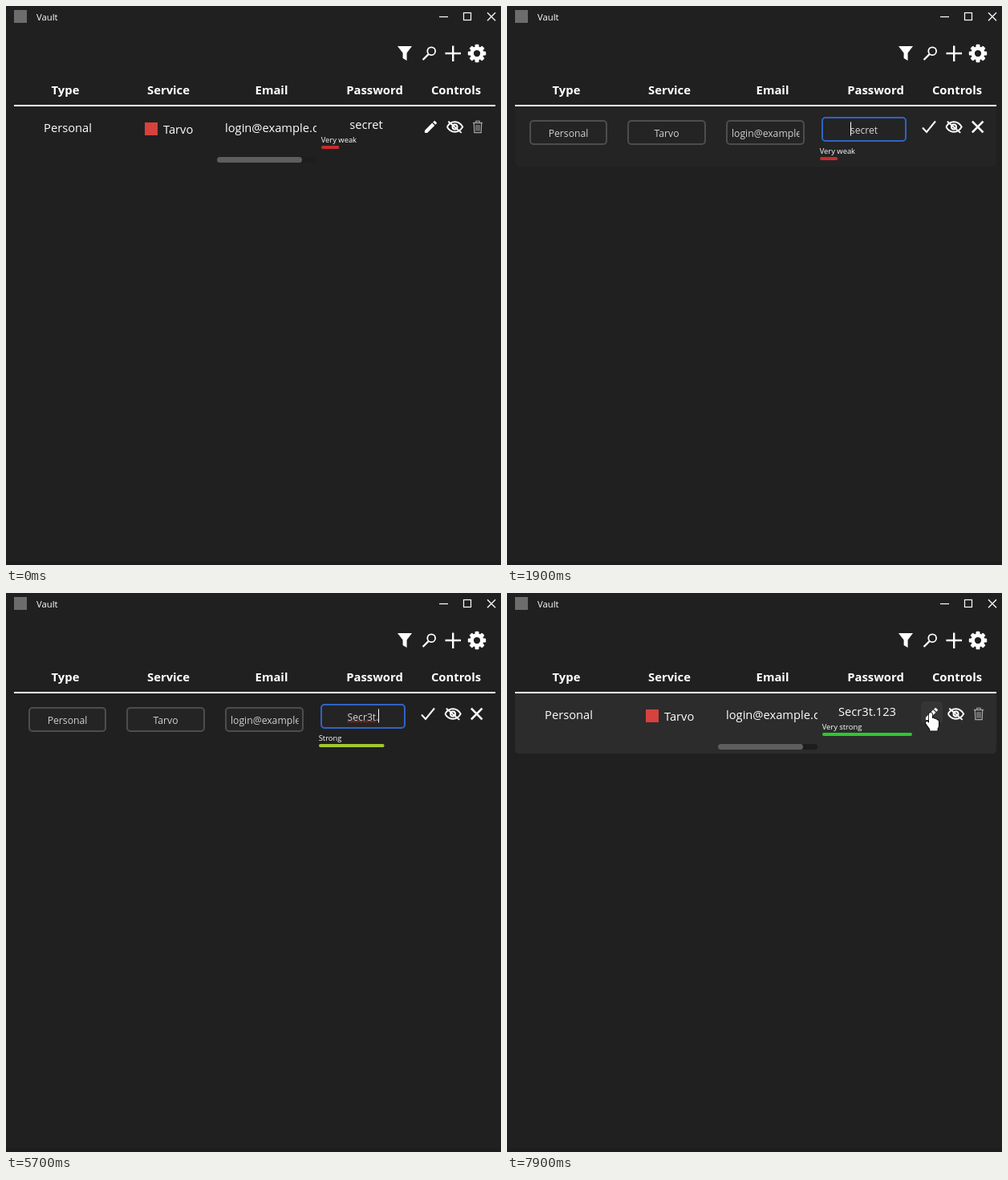
An HTML page with a canvas for the animation above (8000 ms loop, 617x696 px).

```html
<!DOCTYPE html>
<html lang="en">
<head>
<meta charset="utf-8">
<title>Vault</title>
<style>
  html, body { margin: 0; width: 100%; height: 100%; overflow: hidden; background: #202020; }
  canvas { display: block; }
</style>
</head>
<body>
<canvas id="stage" width="617" height="696"></canvas>
<script>
const g = document.getElementById('stage').getContext('2d');
const LOOP = 8000;
const SERVICE = 'Tarvo', EMAIL = 'login@example.com';
const EDIT_START = 730, EDIT_END = 7560;
const VIEW_FONT = 14.7, EDIT_FONT = 12.2;

// time, text, caret index, selected range, misspelling shown
const EDITS = [
  { t: 0, text: 'secret' },
  { t: 1530, text: 'secret', caret: 0 },
  { t: 2460, text: 'secret', sel: [0, 1] },
  { t: 2920, text: 'Secret', caret: 1 },
  { t: 3360, text: 'Secret', caret: 2 },
  { t: 3460, text: 'Secret', caret: 3 },
  { t: 3640, text: 'Secret', caret: 4 },
  { t: 3860, text: 'Secret', caret: 5 },
  { t: 4260, text: 'Secret', sel: [4, 5] },
  { t: 4560, text: 'Secr3t', caret: 5 },
  { t: 5060, text: 'Secr3t', caret: 6, wavy: true },
  { t: 5560, text: 'Secr3t.', caret: 7, wavy: true },
  { t: 5860, text: 'Secr3t.1', caret: 8, wavy: true },
  { t: 6060, text: 'Secr3t.12', caret: 9, wavy: true },
  { t: 6360, text: 'Secr3t.123', caret: 10, wavy: true }
];
const LEVELS = [
  { t: -999, name: 'Very weak', part: 0.2, hue: 0 },
  { t: 2916, name: 'Weak', part: 0.4, hue: 20 },
  { t: 4560, name: 'Medium', part: 0.6, hue: 58 },
  { t: 5615, name: 'Strong', part: 0.8, hue: 82 },
  { t: 5880, name: 'Very strong', part: 1, hue: 120 }
];
const PATHS = [
  [[190, 560, 236], [480, 528, 149], [660, 528, 149], [790, 523, 150],
   [1040, 523, 150], [1270, 421, 161], [1560, 421, 161], [1860, 606, 202]],
  [[6860, 614, 224], [6920, 614, 224], [7330, 523, 150], [7560, 523, 150],
   [7840, 528, 149], [8000, 528, 149]]
];

const clamp = (v) => Math.max(0, Math.min(1, v));
const mix = (a, b, p) => a + (b - a) * p;
const ramp = (t, from, dur) => clamp((t - from) / dur);
const latest = (list, t) => list.reduce((found, e, i) => e.t <= t ? i : found, 0);

function text(s, x, y, size, { align = 'left', color = '#fff', weight = 400 } = {}) {
  g.font = `${weight} ${size}px "Open Sans", "Noto Sans", sans-serif`;
  g.textAlign = align;
  g.fillStyle = color;
  g.fillText(s, x, y);
}

function rect(x, y, w, h, color) {
  g.fillStyle = color;
  g.fillRect(x, y, w, h);
}

function round(x, y, w, h, r, color) {
  g.beginPath();
  g.roundRect(x, y, w, h, r);
  g.fillStyle = color;
  g.fill();
}

function line(points, width, color = '#fff', cap = 'butt') {
  g.beginPath();
  points.forEach(([x, y], i) => i ? g.lineTo(x, y) : g.moveTo(x, y));
  g.lineWidth = width;
  g.strokeStyle = color;
  g.lineCap = cap;
  g.stroke();
}

function ring(x, y, r, width, color = '#fff') {
  g.beginPath();
  g.arc(x, y, r, 0, Math.PI * 2);
  g.lineWidth = width;
  g.strokeStyle = color;
  g.stroke();
}

function at(x, y, draw, scale = 1) {
  g.save();
  g.translate(x, y);
  g.scale(scale, scale);
  draw();
  g.restore();
}

function clipped(x, y, w, h, draw) {
  g.save();
  g.beginPath();
  g.rect(x, y, w, h);
  g.clip();
  draw();
  g.restore();
}

function cross(x, y, r, width) {
  line([[x - r, y - r], [x + r, y + r]], width);
  line([[x + r, y - r], [x - r, y + r]], width);
}

// Icons
function gear(x, y) {
  at(x, y, () => {
    ring(0, 0, 6.3, 4.4);
    for (let i = 0; i < 8; i++) {
      g.rotate(Math.PI / 4);
      round(-2.5, -11.2, 5, 5, 1.2, '#fff');
    }
  });
}

function eye(x, y) {
  at(x, y, () => {
    g.beginPath();
    g.moveTo(-9.7, 0);
    g.bezierCurveTo(-5, -8.3, 5, -8.3, 9.7, 0);
    g.bezierCurveTo(5, 8.3, -5, 8.3, -9.7, 0);
    g.lineWidth = 1.9;
    g.strokeStyle = '#fff';
    g.stroke();
    ring(0, 0, 3, 2);
    line([[-8.2, -6.8], [8.2, 7.4]], 1.9);
  });
}

const PENCIL = new Path2D('M3 17.25V21h3.75L17.8 9.94l-3.75-3.75zM20.7 7.04a1 1 0 0 0 0-1.41l-2.34-2.34a1 1 0 0 0-1.41 0l-1.83 1.83 3.75 3.75z');

function pencil(x, y) {
  at(x, y, () => {
    g.translate(-12, -12);
    g.fillStyle = '#fff';
    g.fill(PENCIL);
  }, 0.84);
}

function trash(x, y) {
  const c = '#a8a8a8';
  at(x, y, () => {
    line([[-6, -5], [6, -5]], 1.3, c);
    line([[-2.2, -5], [-2.2, -7.2], [2.2, -7.2], [2.2, -5]], 1.1, c);
    line([[-4.7, -4.5], [-4.2, 7.2], [4.2, 7.2], [4.7, -4.5]], 1.2, c);
    for (const dx of [-2, 0, 2]) line([[dx, -2.6], [dx, 5.2]], 1, c);
  });
}

// Pointers, each with its hot spot at the origin
const HAND = new Path2D('M-2 2Q-2 0 0 0Q2 0 2 2V7Q4.6 6.2 5 8Q7.4 7.4 7.8 9.2Q10 8.8 10 11V16Q10 18 8.6 20V22.5H-.8V20.5L-5.5 14Q-6.8 11.6-5 11Q-3.6 10.8-2 13Z');
const ARROW = new Path2D('M0 0V16L3.8 12.4L6.3 18L8.8 17L6.3 11.6H11.4Z');
const RESIZE = new Path2D('M-10 0L-6-4V-1H6V-4L10 0L6 4V1H-6V4Z');

function pointerShape(path) {
  g.lineJoin = 'round';
  g.lineWidth = 1.6;
  g.strokeStyle = '#000';
  g.stroke(path);
  g.fillStyle = '#fff';
  g.fill(path);
  g.lineJoin = 'miter';
}

function beam() {
  line([[0, -7], [0, 8]], 1, '#ddd');
  line([[-3.5, -7], [-1, -7]], 1, '#ddd');
  line([[1, -7], [3.5, -7]], 1, '#ddd');
  line([[-3.5, 8.5], [-1, 8.5]], 1, '#ddd');
  line([[1, 8.5], [3.5, 8.5]], 1, '#ddd');
}

function pointerAt(t) {
  const path = PATHS.find((p) => t >= p[0][0] && t < p[p.length - 1][0]);
  if (!path) return null;
  const i = path.findIndex((k) => k[0] > t);
  const [a, b] = [path[i - 1], path[i]];
  const p = ramp(t, a[0], b[0] - a[0]);
  const s = p * p * (3 - 2 * p);
  return { x: mix(a[1], b[1], s), y: mix(a[2], b[2], s) };
}

const inside = (p, x, y, w, h) => p && p.x >= x && p.x <= x + w && p.y >= y && p.y <= y + h;
const overField = (p) => inside(p, 392, 138, 106, 31);
const overButton = (p, editing) => inside(p, editing ? 513 : 516, editing ? 136 : 135, 27, 27);

function pointer(p, editing) {
  at(p.x, p.y, () => {
    if (p.x > 603) pointerShape(RESIZE);
    else if (editing && overField(p)) beam();
    else pointerShape(overButton(p, editing) ? HAND : ARROW);
  });
}

function frame() {
  rect(0, 0, 617, 696, '#202020');
  rect(0, 691, 617, 5, '#1d1d1d');
  rect(10, 5, 16, 16, '#6c6c6c');
  text('Vault', 38, 18, 11.3);
  line([[540, 13.5], [551, 13.5]], 1.2);
  g.strokeRect(570.5, 8.5, 9, 9);
  cross(605, 13.2, 5, 1.3);

  g.beginPath();
  g.moveTo(488, 50);
  g.lineTo(506, 50);
  g.lineTo(499.6, 58.5);
  g.lineTo(499.6, 68);
  g.lineTo(494.6, 65);
  g.lineTo(494.6, 58.5);
  g.fillStyle = '#fff';
  g.fill();
  ring(530.2, 56.2, 4.9, 1.8);
  line([[526.6, 60], [519.6, 67]], 2.4);
  line([[547.5, 59], [567, 59]], 2.4);
  line([[557.2, 49.5], [557.2, 69]], 2.4);
  gear(587, 59);

  const heads = { Type: 74, Service: 202.5, Email: 331, Password: 459.5, Controls: 561 };
  for (const name in heads) {
    text(name, heads[name], 110, 14.8, { align: 'center', weight: 700 });
  }
}

function strength(t, x, y, full) {
  const i = latest(LEVELS, t);
  const now = LEVELS[i], old = LEVELS[Math.max(0, i - 1)];
  const p = 1 - (1 - ramp(t, now.t, 200)) ** 2;
  text(now.name, x - 0.3, y, 9.4);
  round(x, y + 4, full * mix(old.part, now.part, p), 4, 2,
    `hsl(${mix(old.hue, now.hue, p)}, 63%, 48%)`);
}

function viewRow(t, pt) {
  text('Personal', 77, 157, VIEW_FONT, { align: 'center' });
  rect(173, 145, 16, 16, '#d6423d');
  text(SERVICE, 196, 158.5, VIEW_FONT);
  clipped(273, 130, 114, 50, () => text(EMAIL, 273, 157, VIEW_FONT));
  round(263, 188, 124, 7, 3.5, '#1d1d1d');
  round(263, 188, 106, 7, 3.5, '#5e5e5e');
  text(EDITS[latest(EDITS, t)].text, 449, 153, VIEW_FONT, { align: 'center' });
  strength(t, 393, 170, 112);
  if (overButton(pt, false)) round(516, 135, 27, 27, 4, '#353535');
  pencil(529.5, 150.5);
  eye(559.5, 150.5);
  trash(588, 150.5);
}

function field(x, y, w, h, border, color) {
  round(x, y, w, h, 4.5, '#242424');
  g.beginPath();
  g.roundRect(x + border / 2, y + border / 2, w - border, h - border, 4);
  g.lineWidth = border;
  g.strokeStyle = color;
  g.stroke();
}

function wavy(x, end, y) {
  const pts = [];
  for (let i = 0; x + i <= end; i++) pts.push([x + i, y + Math.sin(i * Math.PI / 2) * 1.1]);
  line(pts, 1, '#d22020');
}

function password(t, x, base, size) {
  const e = EDITS[latest(EDITS, t)];
  text(e.text, x, base, size, { align: 'center', color: '#d6d6d6' });
  const left = x - g.measureText(e.text).width / 2;
  const edge = (n) => left + g.measureText(e.text.slice(0, n)).width;
  if (e.sel) {
    const [a, b] = e.sel.map(edge);
    rect(a, base - 14, b - a, 17, '#2f6fd0');
    text(e.text.slice(...e.sel), a, base, size);
  }
  if (e.wavy) wavy(left, edge(6), base + 1.5);
  if (e.caret !== undefined && (t - e.t) % 1060 < 530) {
    rect(Math.round(edge(e.caret)), base - 14, 1, 17, '#fff');
  }
}

function editRow(t, pt) {
  const p = ramp(t, EDIT_START, 235);
  const y = mix(135, 142, p), h = mix(34, 31, p), dx = mix(3, 0, p);
  const size = mix(VIEW_FONT, EDIT_FONT, p), border = mix(0.6, 2, p);
  const gray = mix(58, 77, p), color = `rgb(${gray}, ${gray}, ${gray})`;
  const base = y + h / 2 + mix(5.7, 5, p);
  const ink = { align: 'center', color: '#d0d0d0' };

  [[28, 97], [150, 98], [273, 98]].forEach(([x, w]) => field(x + dx, y, w, h, border, color));
  text('Personal', 76.5 + dx, base, size, ink);
  text(SERVICE, 199 + dx, base, size, ink);
  clipped(279 + dx, y, 85.5, h, () => text(EMAIL, 280 + dx, base, size, { color: '#d0d0d0' }));

  const py = y - mix(4, 4, p), focused = t >= EDITS[1].t;
  field(392 + dx, py, 106, h, border, focused ? '#2f63c6' : color);
  if (!focused && overField(pt)) {
    clipped(392, py + h - 3, 106, 3, () => field(392, py, 106, h, border, '#2f63c6'));
  }
  password(t, 445 + dx, base - 4, size);
  strength(t, 390, mix(187, 184, p), 111);

  if (overButton(pt, true)) round(513, 136, 27, 27, 4, '#353535');
  line([[518, 151.5], [523, 157], [534, 143.5]], 2);
  eye(557, 150.5);
  cross(586.7, 150.5, 6.8, 2.6);
}

function draw(t) {
  const pt = pointerAt(t);
  const editing = t >= EDIT_START && t < EDIT_END;
  frame();
  const glow = ramp(t, 330, 500) * (1 - ramp(t, 1700, 300)) + ramp(t, 7200, 600);
  round(10, 125, 600, 75, [0, 0, 5, 5], `rgba(255, 255, 255, ${0.054 * glow})`);
  rect(10, 123, 600, 2, '#fff');
  (editing ? editRow : viewRow)(t, pt);
  if (pt) pointer(pt, editing);
}

function tick() {
  draw(performance.now() % LOOP);
  requestAnimationFrame(tick);
}
tick();
</script>
</body>
</html>
```
